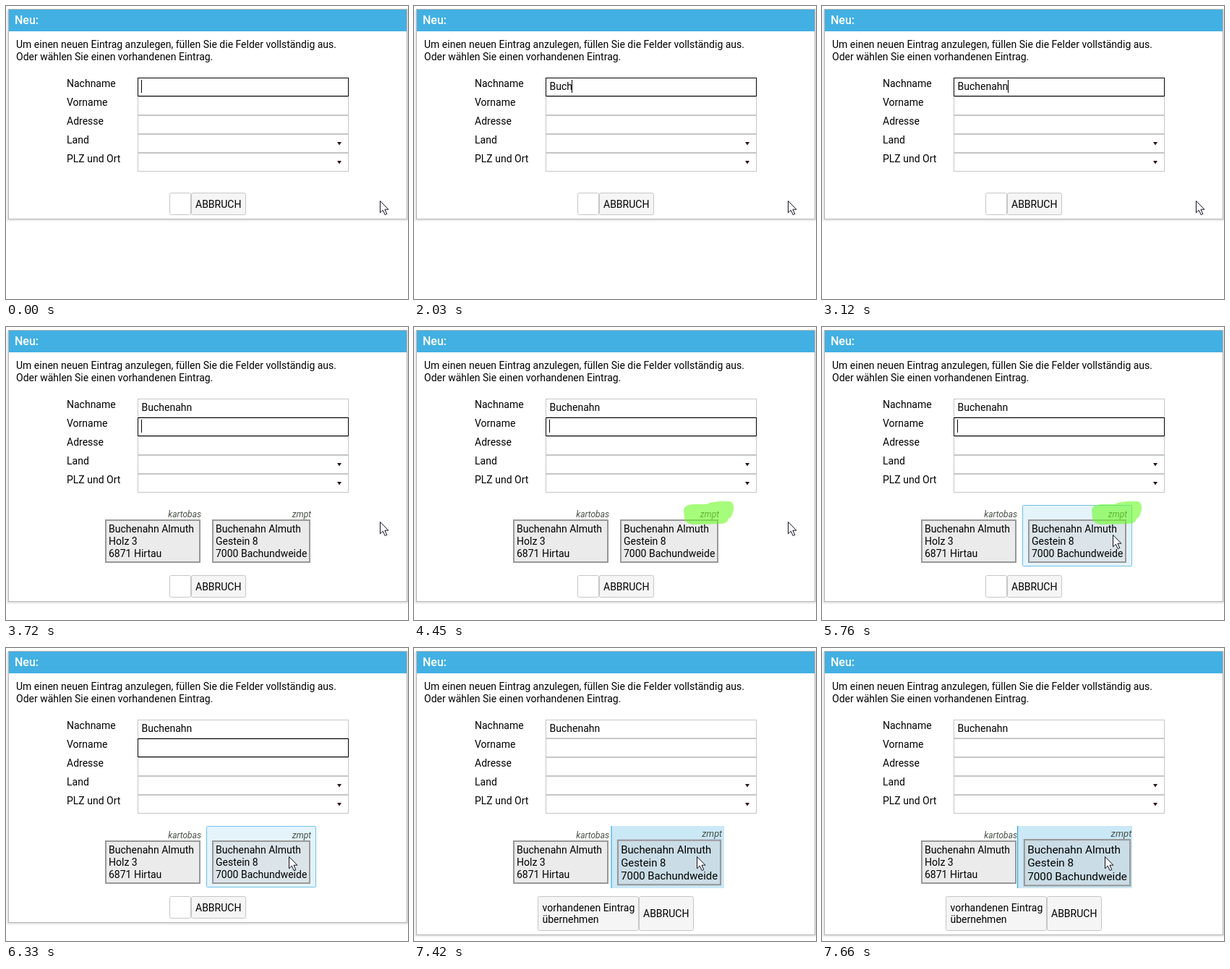
An HTML page that plays this animation: 556 by 405 pixels, repeating every 7.99 s.

```html
<!DOCTYPE html>
<html lang="de">
<head>
<meta charset="utf-8">
<title>Neuer Eintrag</title>
<style>
  html, body { margin: 0; height: 100%; overflow: hidden; background: #fff; }
  svg { display: block; width: 556px; height: 405px; }
  text { font: 14px Roboto, Arial, sans-serif; fill: #000; white-space: pre; }
  .title { font-size: 16px; font-weight: 500; fill: #fff; }
  .origin { font-size: 12px; font-style: italic; fill: #454f45; text-anchor: end; }
</style>
</head>
<body>
<svg id="stage" viewBox="0 0 556 405" xmlns="http://www.w3.org/2000/svg">
  <clipPath id="cell"><rect x="262" y="246" width="167" height="86"/></clipPath>
</svg>
<script>
const LOOP = 7990;
const stage = document.getElementById('stage');

function add(parent, tag, attrs = {}, content = '') {
  const node = document.createElementNS(stage.namespaceURI, tag);
  set(node, attrs);
  node.textContent = content;
  return parent.appendChild(node);
}
function set(node, attrs) {
  for (const key in attrs) node.setAttribute(key, attrs[key]);
}
function show(node, visible) {
  node.style.display = visible ? '' : 'none';
}
const label = (parent, x, y, content, cls = '') =>
  add(parent, 'text', { x, y, class: cls }, content);

// Rectangle with a crisp border drawn inside its outer size
function box(parent, x, y, width, height, fill, stroke, line = 1, rx = 0) {
  return add(parent, 'rect', {
    x: x + line / 2, y: y + line / 2, width: width - line, height: height - line,
    fill, stroke, rx, 'stroke-width': line
  });
}

// Value of the last step that has begun
function at(steps, t) {
  let value;
  for (const [time, v] of steps) if (t >= time) value = v;
  return value;
}

// Dialog
const shadows = [3, 2, 1].map(grow => add(stage, 'rect', {
  x: 3 - grow, y: 5, width: 552 + 2 * grow, rx: grow, fill: '#000', opacity: 0.035
}));
const panel = box(stage, 3, 4, 552, 291, '#fff', '#b4b4b4');
add(stage, 'rect', { x: 4, y: 5, width: 550, height: 30, fill: '#42b0e2' });
label(stage, 12, 25, 'Neu:', 'title');
label(stage, 14, 58, 'Um einen neuen Eintrag anzulegen, füllen Sie die Felder vollständig aus.');
label(stage, 14, 75, 'Oder wählen Sie einen vorhandenen Eintrag.');

// Form
const fields = ['Nachname', 'Vorname', 'Adresse', 'Land', 'PLZ und Ort'].map((name, i) => {
  const y = 99 + 26 * i;
  label(stage, 84, y + 13, name);
  const field = box(stage, 182, y, 292, 26, '#fff', '#c6c6c6');
  if (i > 2) add(stage, 'path', { d: `M458 ${y + 11}h6l-3 4.5z`, fill: '#2a1216' });
  return field;
});
const surname = 'Buchenahn';
const typed = label(stage, 187.5, 116, '');
const caret = add(stage, 'rect', { width: 1, height: 18, fill: '#000' });

// Address cards: translucent grey, so the selection colour shines through
const cards = add(stage, 'g');
function card(parent, x, width, origin, lines) {
  label(parent, x + width + 1, 263, origin, 'origin');
  const face = box(parent, x, 266, width, 60, '#c8c8c8', '#999', 2);
  set(face, { 'fill-opacity': 0.36 });
  lines.forEach((line, i) => label(parent, x + 5, 284 + 17 * i, line));
}
card(cards, 137, 132, 'kartobas', [surname + ' Almuth', 'Holz 3', '6871 Hirtau']);
const cell = add(cards, 'g', { 'clip-path': 'url(#cell)' });
const zoomed = add(cell, 'g');
const tint = box(zoomed, 277, 246, 152, 85, '', '', 1, 1);
card(zoomed, 285, 136, 'zmpt', [surname + ' Almuth', 'Gestein 8', '7000 Bachundweide']);

// Buttons
const buttons = add(stage, 'g');
const accept = box(buttons, 226, 0, 30, 31, '#fff', '#c6c6c6', 1, 2);
const cancel = box(buttons, 256, 0, 76, 31, '#f5f5f5', '#c6c6c6', 1, 2);
const cancelText = label(buttons, 262, 21, 'ABBRUCH');
const acceptText = add(buttons, 'g');
label(acceptText, 177.5, 21, 'vorhandenen Eintrag');
label(acceptText, 177.5, 37, 'übernehmen');

const marker = add(stage, 'path', {
  fill: '#6bfc24', opacity: 0.6,
  d: 'M373 252Q374 246 386 245L405 245 409 243Q424 240 436 241Q443 242 442 252' +
     'Q440 263 435 265Q434 272 424 272L386 273Q375 272 374 264Z'
});
const pointer = add(stage, 'path', {
  d: 'M.5.5v16.3l3.8-3.6 2.9 6.3 2.6-1.1-2.9-6.2h5z', fill: '#fff', stroke: '#101020'
});

const typing = [0, 1170, 1400, 1570, 2030, 2200, 2560, 2730, 2790, 3120].map((time, i) => [time, i]);
const caretOn = [[0, 1], [240, 0], [700, 1], [3950, 0], [4450, 1], [4920, 0], [5380, 1],
  [6000, 0], [6460, 1], [7200, 0]];
const focus = [[0, 0], [3350, 1], [7200, -1]];
const panelHeight = [[0, 291], [3600, 376], [7200, 393]];
const cardsOpacity = [[0, 0], [3600, 0.5], [3720, 1]];
const zoom = [[0, 1], [7300, 1.03], [7410, 1.06], [7520, 1.08], [7660, 1.092]];
const pointerAt = [[0, [517, 269]], [5450, [474, 276]], [5520, [428, 281]], [5620, [413, 285]],
  [5700, [402, 287]], [5780, [395, 288]], [5860, [391, 288]]];

function render(t) {
  const height = at(panelHeight, t);
  set(panel, { height: height - 1 });
  shadows.forEach((shadow, i) => set(shadow, { height: height + 2 - i }));

  const active = at(focus, t);
  fields.forEach((field, i) => set(field, { stroke: i === active ? '#000' : '#c6c6c6' }));
  const text = surname.slice(0, at(typing, t));
  if (typed.textContent !== text) typed.textContent = text;
  const advance = active === 0 && text ? Math.round(typed.getComputedTextLength()) : 0;
  set(caret, { x: 187 + advance, y: active === 1 ? 128 : 102 });
  show(caret, at(caretOn, t));

  const selected = t >= 7200;
  const opacity = at(cardsOpacity, t);
  set(cards, { opacity });
  show(cards, opacity > 0);
  const scale = at(zoom, t);
  set(zoomed, { transform: `translate(353 288.5) scale(${scale}) translate(-353 -288.5)` });
  show(tint, t >= 5620);
  set(tint, selected ? { fill: '#cbe8f6', stroke: '#26a0da' } : { fill: '#e5f3fb', stroke: '#70c0e7' });

  set(buttons, { transform: `translate(0 ${t < 3600 ? 258 : 343})` });
  const buttonHeight = selected ? 47 : 30;
  set(accept, {
    x: selected ? 171.5 : 226.5, width: selected ? 139 : 29,
    height: buttonHeight, fill: selected ? '#f5f5f5' : '#fff'
  });
  set(cancel, { x: selected ? 311.5 : 256.5, height: buttonHeight });
  set(cancelText, { x: selected ? 317 : 262, y: selected ? 29 : 21 });
  show(acceptText, selected);

  show(marker, t >= 4450 && t < 6330);
  set(pointer, { transform: `translate(${at(pointerAt, t)})` });
}

const start = performance.now();
function tick() {
  render((performance.now() - start) % LOOP);
  requestAnimationFrame(tick);
}
tick();
</script>
</body>
</html>
```
